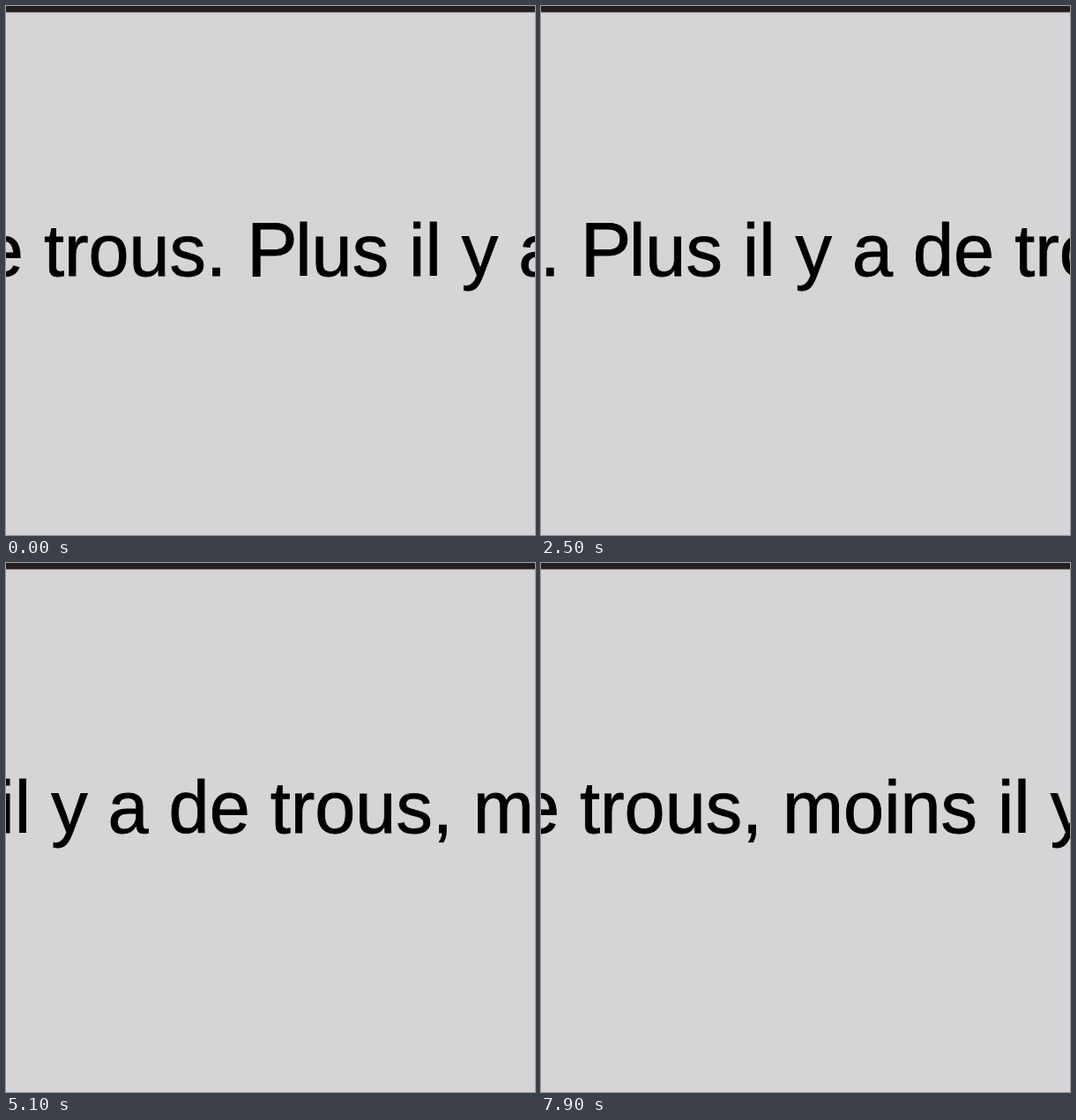
These frames come from a looping animation (600x600 px, 8 s). An HTML page:

```html
<!DOCTYPE html>
<html lang="fr">
<head>
<meta charset="utf-8">
<title>Trous</title>
<style>
  html, body {
    margin: 0;
    width: 100%;
    height: 100%;
    overflow: hidden;
    background: #d6d4d6;
  }
  svg {
    display: block;
    width: 600px;
    height: 600px;
  }
  text {
    font: 82.8px "Liberation Sans", Arial, Helvetica, sans-serif;
    font-kerning: none;
    white-space: pre;
    stroke: #000;
    stroke-width: .8px;
    animation: scroll 8s steps(80, end) infinite;
  }
  /* Capital raised to the height of the tall letters, same advance */
  .cap {
    font-size: 1.045em;
    letter-spacing: -.0287em;
  }
  @keyframes scroll {
    to { transform: translateX(-730.5px); }
  }
</style>
</head>
<body>
<svg viewBox="0 0 600 600">
  <rect width="600" height="6" fill="#231f21"/>
  <rect y="6" width="600" height="1" fill="#383537"/>
  <rect y="7" width="600" height="1" fill="#a9a7a9"/>
  <text x="-72.2" y="305.8">de trous. <tspan class="cap">P</tspan>lus il y a de trous, moins il y a de</text>
</svg>
</body>
</html>
```
